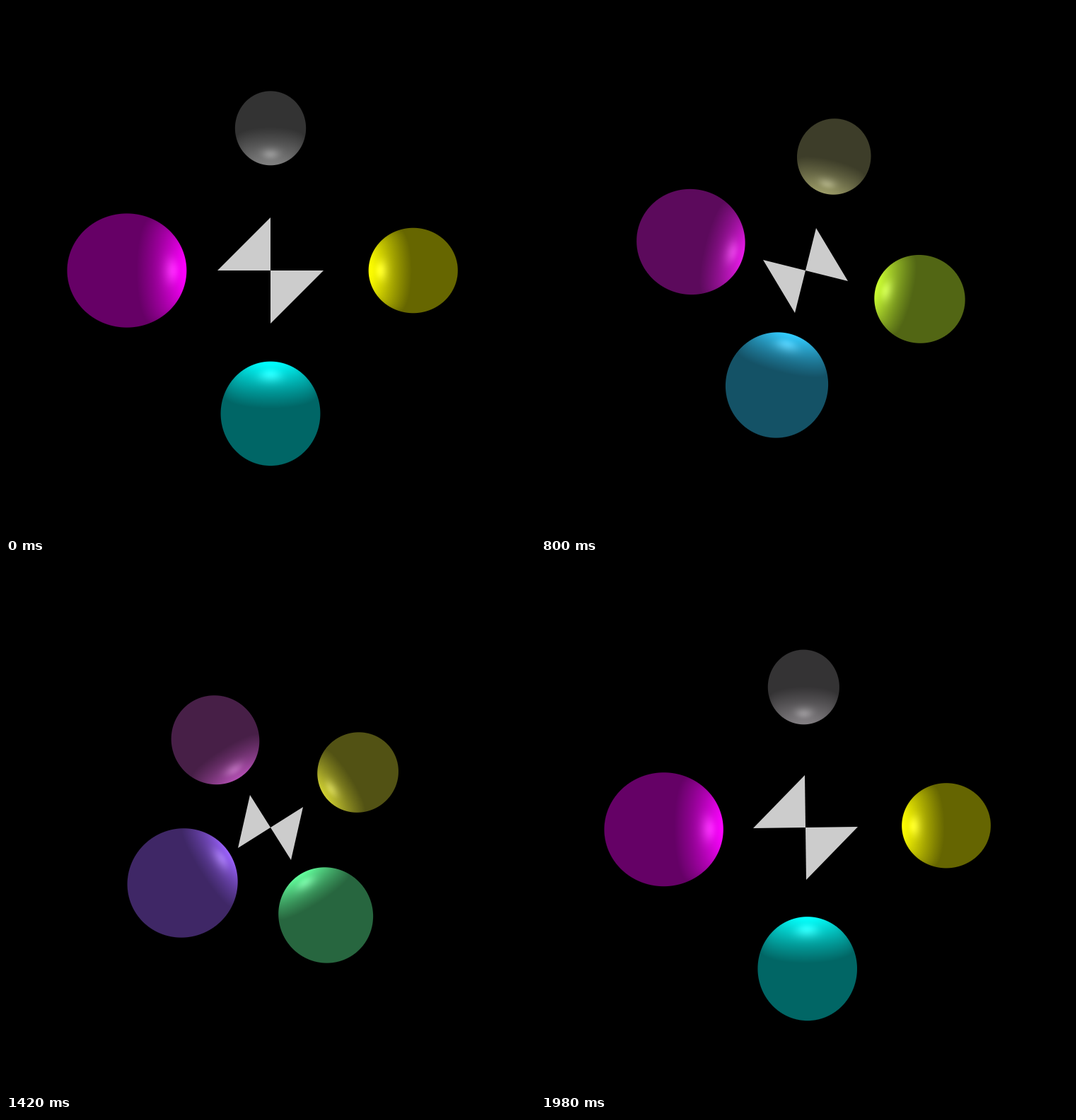
These frames come from a looping animation (748x748 px, 2000 ms). An HTML page with a canvas:

```html
<!DOCTYPE html>
<html lang="en">
<head>
<meta charset="utf-8">
<title>Four lit spheres</title>
<style>
  html, body { margin: 0; width: 100%; height: 100%; overflow: hidden; background: #000; }
  canvas { display: block; width: 748px; height: 748px; }
</style>
</head>
<body>
<canvas id="stage" width="748" height="748"></canvas>
<script>
const SIZE = 748, HALF = SIZE / 2;
const LOOP = 2000, STEP = 20, HOLD = 500;
const FOCAL = HALF / Math.tan(Math.PI / 6); // 60 degree field of view
const ORBIT = 200, TIP = 75;
const AMBIENT = 0.4, DIFFUSE = 0.6, SPECULAR = 40, SHININESS = 10;

// Stations clockwise from the top; each sphere travels to the next one.
const STATIONS = [
  { x: 0, y: -1, r: 50, color: [128, 128, 128] },
  { x: 1, y: 0, r: 60, color: [255, 255, 0] },
  { x: 0, y: 1, r: 70, color: [0, 255, 255] },
  { x: -1, y: 0, r: 80, color: [255, 0, 255] }
];

const ctx = document.getElementById('stage').getContext('2d');
const image = ctx.createImageData(SIZE, SIZE);
const pixels = new Uint32Array(image.data.buffer);
const BLACK = 0xff000000;

const mix = (a, b, s) => a + (b - a) * s;
const smooth = s => s * s * (3 - 2 * s);

function between(index, s) {
  const a = STATIONS[index], b = STATIONS[(index + 1) % 4];
  return {
    x: mix(a.x, b.x, s),
    y: mix(a.y, b.y, s),
    r: mix(a.r, b.r, s),
    color: a.color.map((c, i) => mix(c, b.color[i], s))
  };
}

// Ray-traced sphere, lit by a point light at the centre of the scene.
function drawSphere({ x, y, r, color }) {
  const cx = x * ORBIT, cy = y * ORBIT;
  const reach = r * 1.15 + 6;
  const left = Math.floor(HALF + cx - reach), right = Math.ceil(HALF + cx + reach);
  const top = Math.floor(HALF + cy - reach), bottom = Math.ceil(HALF + cy + reach);
  const eyeSquared = cx * cx + cy * cy + FOCAL * FOCAL;

  for (let py = top; py < bottom; py++) {
    for (let px = left; px < right; px++) {
      let dx = px + 0.5 - HALF, dy = py + 0.5 - HALF, dz = -FOCAL;
      const len = Math.hypot(dx, dy, dz);
      dx /= len; dy /= len; dz /= len;
      const along = cx * dx + cy * dy - FOCAL * dz;
      const missSquared = eyeSquared - along * along;

      // Soft rim: the share of the pixel inside the outline.
      const coverage = Math.min(1, r - Math.sqrt(missSquared) + 0.5);
      if (coverage <= 0) continue;

      const t = along - Math.sqrt(Math.max(0, r * r - missSquared));
      const hx = dx * t, hy = dy * t, hz = FOCAL + dz * t;
      const nx = (hx - cx) / r, ny = (hy - cy) / r, nz = hz / r;
      const dist = Math.hypot(hx, hy, hz);
      const lx = -hx / dist, ly = -hy / dist, lz = -hz / dist;
      const facing = nx * lx + ny * ly + nz * lz;

      let level = AMBIENT, shine = 0;
      if (facing > 0) {
        level += DIFFUSE * facing;
        const mirror = -(2 * facing * (nx * dx + ny * dy + nz * dz) - (lx * dx + ly * dy + lz * dz));
        shine = SPECULAR * Math.pow(Math.max(0, mirror), SHININESS);
      }
      const [red, green, blue] = color.map(v => Math.round(Math.min(255, v * level + shine) * coverage));
      pixels[py * SIZE + px] = (BLACK | blue << 16 | green << 8 | red) >>> 0;
    }
  }
}

function drawBowTie(s) {
  const top = between(0, s), right = between(1, s);
  ctx.fillStyle = '#ccc';
  for (const k of [TIP, -TIP]) {
    ctx.beginPath();
    ctx.moveTo(HALF, HALF);
    ctx.lineTo(HALF + top.x * k, HALF + top.y * k);
    ctx.lineTo(HALF + right.x * k, HALF + right.y * k);
    ctx.fill();
  }
}

function draw(time) {
  const travel = Math.max(0, (time - HOLD) / (LOOP - HOLD));
  const turn = time < HOLD ? 1 - smooth(time / HOLD) : travel;
  pixels.fill(BLACK);
  STATIONS.forEach((_, i) => drawSphere(between(i, travel)));
  ctx.putImageData(image, 0, 0);
  drawBowTie(turn);
}

const start = performance.now();
let shown = -1;

function tick() {
  const elapsed = (performance.now() - start) % LOOP;
  const time = Math.floor(elapsed / STEP) * STEP;
  if (time !== shown) draw(shown = time);
  requestAnimationFrame(tick);
}
tick();
</script>
</body>
</html>
```
